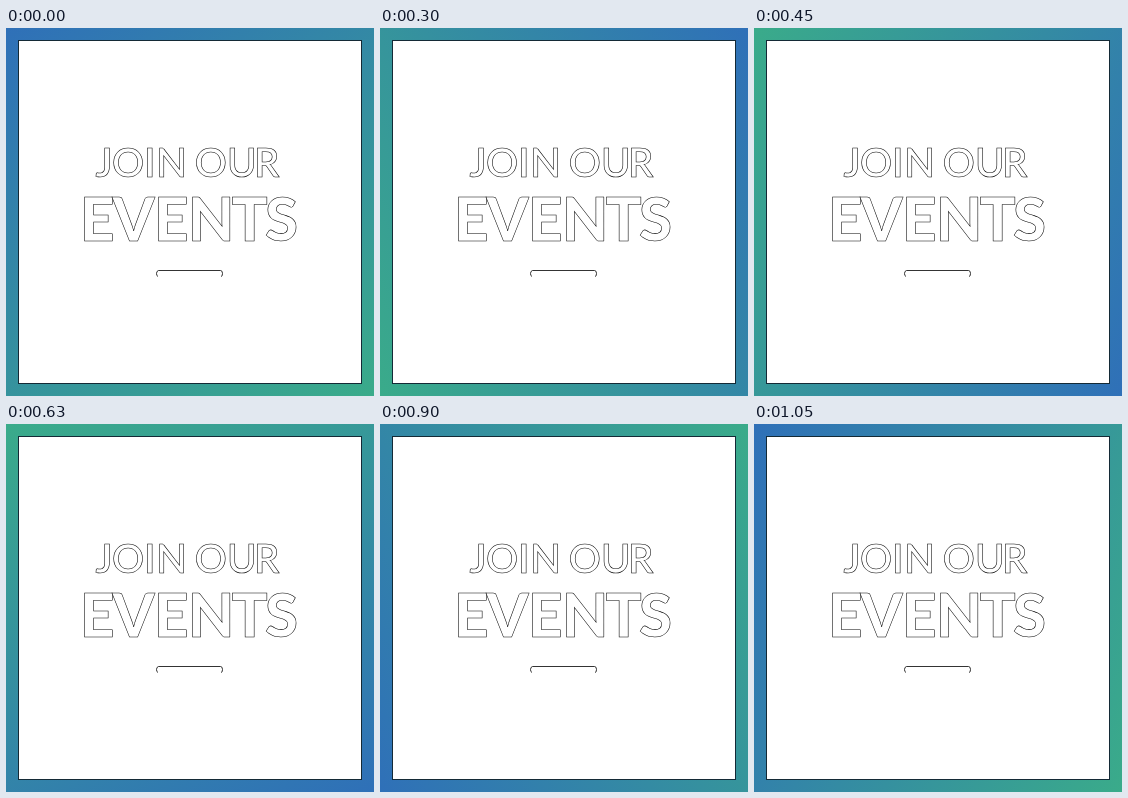
Write an HTML page that moves like this. It is 368 by 368 pixels and loops after 1200 ms.

```html
<!DOCTYPE html>
<html lang="en">
<head>
<meta charset="utf-8">
<title>Join our events</title>
<style>
  @property --angle {
    syntax: "<angle>";
    inherits: false;
    initial-value: 145deg;
  }

  html, body {
    margin: 0;
    width: 100%;
    height: 100%;
    overflow: hidden;
  }

  .frame {
    width: 368px;
    height: 368px;
    background: linear-gradient(var(--angle), #2f70b8, #3aab8a);
    animation: turn 1200ms step-end infinite;
  }

  svg {
    display: block;
    fill: #fff;
    stroke: #000;
  }

  .card {
    stroke: #142a36;
    shape-rendering: crispEdges;
  }

  .bar { stroke-width: .8; }

  text {
    font-family: Lato, "Open Sans", sans-serif;
    stroke-width: .55;
  }

  .lead { font-size: 40px; font-weight: 600; }
  .title { font-size: 60px; font-weight: 800; }

  /* Each quarter turn rests, then advances in hard steps. */
  @keyframes turn {
    0%    { --angle: 145deg; }
    5%    { --angle: 173deg; }
    10%   { --angle: 202deg; }
    25%   { --angle: 238deg; }
    30%   { --angle: 265deg; }
    37.5% { --angle: 295deg; }
    52.5% { --angle: 335deg; }
    60%   { --angle: 382deg; }
    75%   { --angle: 418deg; }
    80%   { --angle: 445deg; }
    87.5% { --angle: 473deg; }
    100%  { --angle: 505deg; }
  }
</style>
</head>
<body>
<div class="frame">
  <svg width="368" height="368" viewBox="0 0 368 368">
    <rect class="card" x="12.5" y="12.5" width="343" height="343"/>
    <text class="lead" y="148.5" x="89.5 106 138 150.2 180 188.8 221 248">JOIN OUR</text>
    <text class="title" y="212.5" x="74 106.5 148 182 225.5 259">EVENTS</text>
    <path class="bar" d="M152 248.5q-1.5-.5-1.5-3t2-3h62q2 0 2 3t-1.5 3"/>
  </svg>
</div>
</body>
</html>
```
